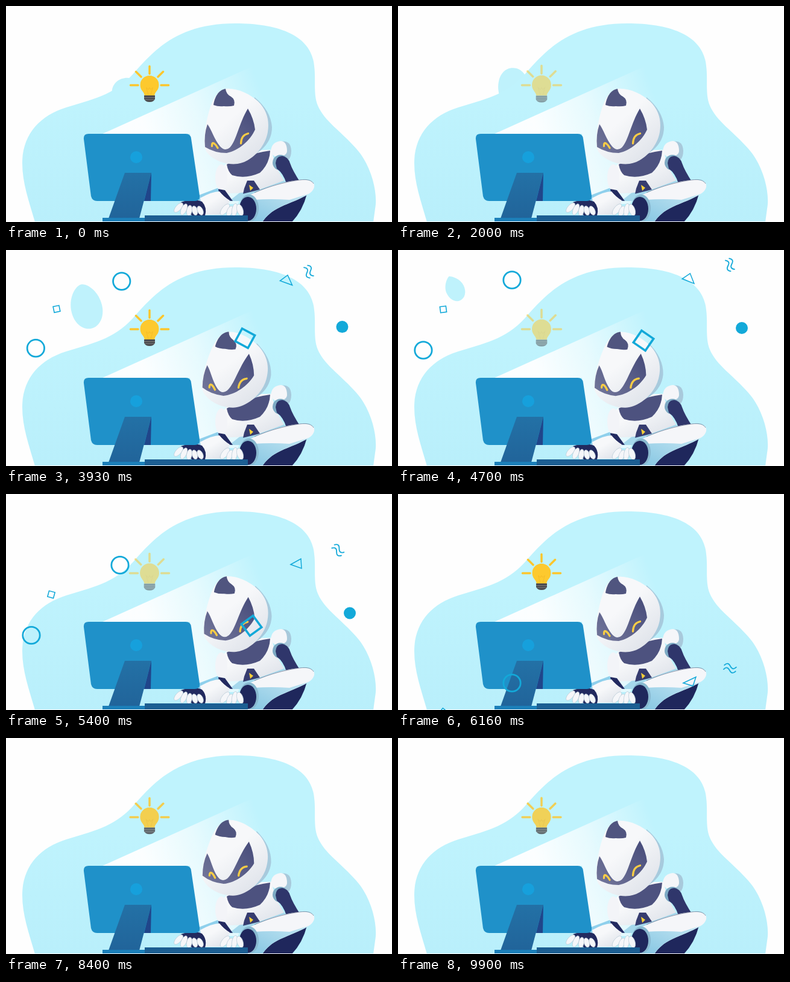
These frames come from a looping animation (640 px wide and 360 px high, 9930 ms). An HTML page:

```html
<!DOCTYPE html>
<html lang="en">
<head>
<meta charset="utf-8">
<title>Robot with an idea</title>
<style>
html, body { margin: 0; width: 100%; height: 100%; overflow: hidden; background: #fefefe; }
svg { display: block; width: 100vw; height: 100vh; }
</style>
</head>
<body>
<svg viewBox="0 0 640 360" xmlns="http://www.w3.org/2000/svg">
  <defs>
    <linearGradient id="sky" x1="0" y1="0" x2="0" y2="1">
      <stop offset=".4" stop-color="#bff3fd"/><stop offset="1" stop-color="#b9effb"/>
    </linearGradient>
    <linearGradient id="beam" gradientUnits="userSpaceOnUse" x1="235" y1="215" x2="425" y2="145">
      <stop offset="0" stop-color="#fff" stop-opacity=".95"/>
      <stop offset=".45" stop-color="#fff" stop-opacity=".62"/>
      <stop offset="1" stop-color="#fff" stop-opacity="0"/>
    </linearGradient>
    <linearGradient id="shell" x1="0" y1="0" x2=".75" y2="1">
      <stop offset=".45" stop-color="#f7f8fa"/><stop offset="1" stop-color="#dfe3ea"/>
    </linearGradient>
    <linearGradient id="visor" x1="0" y1="1" x2="1" y2="0">
      <stop offset="0" stop-color="#73779b"/><stop offset="1" stop-color="#454a79"/>
    </linearGradient>
    <linearGradient id="shade" x1="0" y1="1" x2="1" y2="0">
      <stop offset="0" stop-color="#86c6e2"/><stop offset="1" stop-color="#c4e6f3"/>
    </linearGradient>
    <linearGradient id="stand" x1="0" y1="0" x2="0" y2="1">
      <stop offset="0" stop-color="#2371a6"/><stop offset="1" stop-color="#21649a"/>
    </linearGradient>
  </defs>

  <rect width="640" height="360" fill="#fefefe"/>
  <path id="drop" fill="#bff2fc"/>
  <path fill="url(#sky)" d="M48 360C38 325 27 295 27 262C27 215 55 183 100 169C140 156 178 150 211 113C245 74 285 29 380 29C452 29 507 49 511 100C514 122 509 147 517 166C528 192 556 209 581 238C606 266 617 312 612 338L609 360Z"/>
  <path fill="url(#beam)" d="M160 213L410 100L440 180L385 330H318L305 213Z"/>

  <g id="bulb">
    <path d="M238 100.500V113M224 118L215.500 109.500M252 118L260.500 109.500M206.500 132H219M257 132H269.500" stroke="#fdc62c" stroke-width="3.500" stroke-linecap="round"/>
    <path d="M229.500 149C229.500 143 222.500 141 222.500 131.500A15.500 15.500 0 0 1 253.500 131.500C253.500 141 246.500 143 246.500 149Z" fill="#fdc92e"/>
    <path d="M236 148L232.500 136L236 139L238 136L240 139L243.500 136L240 148" fill="none" stroke="#f6bd28"/>
    <path d="M229 149H247V155Q245 160 238 160Q231 160 229 155Z" fill="#4b4b4e"/>
    <path d="M229 152.500H247M230 156H246" stroke="#8a8a8a" stroke-width=".8"/>
  </g>

  <g id="body">
    <path d="M318 316L352 303L362 316L320 328Z" fill="#8fd0ec"/>
    <path d="M422 360L440 338L499 313Q492 341 474 360Z" fill="#1f275c"/>
    <path d="M398 303L446 284L470 296L410 325L370 325Z" fill="#a5d8ec"/>
    <path d="M455 226Q472 223 473 241Q473 255 464 260L446 240Z" fill="#a8c9db"/>
    <path d="M361 267Q390 238 440 240Q447 270 461 291L420 306Q395 313 364 312Q358 287 361 267Z" fill="url(#shell)"/>
    <ellipse cx="357" cy="286" rx="10" ry="22" fill="#f3f4f8"/>
    <path d="M352 305L363 307L376 325L355 323Z" fill="#232a60"/>
    <path d="M366 264Q400 246 438 241Q437 263 421 278Q397 289 375 282Q368 276 366 264Z" fill="#4d527f"/>
    <path d="M395 304L400 291H411L421 306L393 313Z" fill="#363c6f"/>
    <path d="M403 298L410 303L405 308Z" fill="#f5cf38"/>
    <path d="M439 241Q441 226 456 225Q466 226 466 242Q465 250 451 252Q441 251 439 241Z" fill="#f5f6f9"/>
    <circle cx="455" cy="261" r="13" fill="#7daac4"/>
    <path d="M447 262Q448 250 458 250Q468 252 471 262Q475 274 488 294L465 296Q460 279 449 271Z" fill="#2f366b"/>
  </g>

  <g id="head">
    <path d="M412 152Q439 174 441 202Q441 224 423 240L404 254Z" fill="#a7cadd"/>
    <path d="M364 138C382 136 404 146 418 159C433 174 437 191 434 210C430 235 407 260 384 263C359 266 335 252 330 238C327 222 331 193 338 171C343 155 351 141 364 138Z" fill="url(#shell)"/>
    <path d="M364 138C352 140 346 152 344 165Q352 168 361 167Q371 168 378 166Q381 156 373 151Q365 147 364 138Z" fill="#50557f"/>
    <path d="M334 197C341 206 345 222 355 234Q363 243 371 236C382 225 386 196 401 171Q411 188 413 206C405 224 386 241 366 245Q346 245 330 235Q328 214 334 197Z" fill="url(#visor)"/>
    <path d="M341.500 233.500Q341 227 345 229Q348 231 351 236.500M389.500 229Q390 215 401.500 212.500" fill="none" stroke="#f9cd45" stroke-width="3.300" stroke-linecap="round"/>
  </g>

  <g id="arms">
    <path d="M322 320Q342 309 354 309Q361 318 371 324L361 348L326 348Z" fill="url(#shell)"/>
    <path d="M290 327Q312 320 325 326Q334 336 330 349H308Z" fill="#222a5f"/>
    <path d="M396 320C412 310 440 299 462 294C480 290 500 287 509 294C514 300 510 308 502 313C490 321 470 328 455 335C440 342 432 350 425 360H404Z" fill="#f5f6f9"/>
    <path d="M411 323Q440 321 470 323L502 313C490 321 470 328 455 335C440 342 432 350 425 360H406Q418 342 411 323Z" fill="url(#shade)"/>
    <path d="M412 311C440 299 462 294 480 291S505 289 510 296" fill="none" stroke="#4c5573" stroke-width=".6"/>
    <ellipse cx="403" cy="337" rx="16" ry="23" fill="#89b9d0"/>
    <ellipse cx="401" cy="338" rx="14" ry="20" fill="#1f275c"/>
    <g id="fingers" fill="#f5f6f9" stroke="#b9cbd7" stroke-width=".7"/>
  </g>

  <path d="M137 213H298Q306 213 307 221L321 316Q322 325 313 325H151Q143 325 141 317L129 222Q128 213 137 213Z" fill="#1f91c9"/>
  <circle cx="216" cy="252" r="10" fill="#16a0dc"/>
  <path d="M197 278H241L221 354H170Z" fill="url(#stand)"/>
  <path d="M241 278L240 325H229Z" fill="#20458a"/>
  <path d="M160 353H245V360H160Z" fill="#1b7fb9"/>
  <path d="M230 349H401V360H230Z" fill="#1c5e92"/>
  <path d="M0 359H640V360H0Z" fill="#fefefe"/>
  <g id="bits" fill="none" stroke="#13a9d9" stroke-linecap="round"/>
</svg>
<script>
const LOOP = 9930, HOLD = 1230;
const NS = 'http://www.w3.org/2000/svg';
const el = id => document.getElementById(id);
const lerp = (a, b, u) => a + (b - a) * u;
const clamp = u => Math.max(0, Math.min(1, u));
const unit = (t, a, b) => clamp((t - a) / (b - a));
const smooth = u => u * u * (3 - 2 * u);
const easeOut = u => 1 - (1 - u) ** 3;
const wavePhase = turns => Math.cos(turns * 2 * Math.PI);

function add(parent, tag, attrs) {
  const node = document.createElementNS(NS, tag);
  for (const key in attrs) node.setAttribute(key, attrs[key]);
  return parent.appendChild(node);
}

// cx, cy, rx, ry, tilt
[[286, 336, 4.5, 10, 42], [295, 339, 4.5, 10, 25], [304, 341, 4.5, 9, 10],
 [313, 341, 4.5, 8, -15], [322, 341, 4.5, 8, -25], [363, 339, 5, 11, 38],
 [371, 342, 4.5, 9, 22], [379, 340, 4.5, 11, 10], [388, 340, 5, 10, -18]
].forEach(([cx, cy, rx, ry, a]) =>
  add(el('fingers'), 'ellipse', { cx, cy, rx, ry, transform: `rotate(${a} ${cx} ${cy})` }));

const wave = y => `M-10.5 ${y}Q-5.5 ${y - 7} -.5 ${y}T9.500 ${y}`;
const square = (s, w) => ['rect', { x: -s / 2, y: -s / 2, width: s, height: s, 'stroke-width': w, 'stroke-linecap': 'butt' }];
const ring = ['circle', { r: 14.2, 'stroke-width': 2.8 }];
const early = u => smooth(u ** .75);

// x, y: top of flight; start, end: launch span; rot: angles at launch, top and exit
const bits = [
  { x: 551, y: 24, start: 2700, end: 4500, rot: [32, 66, 10], ease: early, shape: ['path', { d: wave(-3) + wave(4), 'stroke-width': 1.8 }] },
  { x: 189, y: 49, start: 3180, end: 4400, rot: [0, 0, 0], shape: ring },
  { x: 42, y: 166, start: 3200, end: 4300, rot: [0, 0, 0], shape: ring },
  { x: 75, y: 98, start: 3250, end: 4350, rot: [-60, -9, 40], shape: square(10, 1.6) },
  { x: 407, y: 150, start: 3220, end: 4400, rot: [-40, 33, 75], shape: square(24, 3.6) },
  { x: 570, y: 129, start: 3200, end: 4300, rot: [0, 0, 0], shape: ['circle', { r: 10, fill: '#13a9d9', stroke: 'none' }] },
  { x: 483, y: 47, start: 3250, end: 4400, rot: [-30, 0, 0], tri: true, shape: ['path', { 'stroke-width': 1.5 }] }
];
for (const b of bits) b.node = add(el('bits'), ...b.shape);

function drawBits(t) {
  const fall = 110 * (Math.max(0, t - 4606) / 1000) ** 2;
  const turn = unit(t, 4650, 6160);
  for (const b of bits) {
    const u = unit(t, b.start, b.end);
    const go = (b.ease || easeOut)(u);
    const x = lerp(237, b.x, go), y = lerp(104, b.y, go) + fall;
    const a = turn > 0 ? lerp(b.rot[1], b.rot[2], turn) : lerp(b.rot[0], b.rot[1], go);
    b.node.style.display = u > 0 && y < 385 ? '' : 'none';
    b.node.setAttribute('transform', `translate(${x} ${y}) rotate(${a}) scale(${Math.min(1, .3 + u * 3)})`);
    if (b.tri) {
      const m = (p, q) => lerp(p, q, turn);
      b.node.setAttribute('d', `M${m(-12, -10)} ${m(0, 2)}L${m(1, 11)} ${m(-9, -8)}L${m(8, 6)} ${m(8, 7)}Z`);
    }
  }
}

// time, cx, cy, rx, ry, tilt, roundness of the tip
const dropKeys = [
  [HOLD, 199, 141, 24, 21, -20, .55],
  [2200, 191, 135, 26, 34, -5, .6],
  [3100, 177, 128, 37.5, 55, 0, .62],
  [4700, 94, 64, 15.5, 22, -25, .16],
  [5400, 76, 45, 0, 0, -30, .1]
];

function drawDrop(t) {
  const time = Math.max(HOLD, t);
  let i = 0;
  while (i < dropKeys.length - 2 && time > dropKeys[i + 1][0]) i++;
  const from = dropKeys[i], to = dropKeys[i + 1];
  const u = smooth(unit(time, from[0], to[0]));
  const [, cx, cy, rx, ry, tilt, k] = from.map((v, j) => lerp(v, to[j], u));
  const X = v => v * rx, Y = v => v * ry;
  el('drop').setAttribute('d',
    `M0 ${Y(-1)}C${X(k)} ${Y(-1)} ${X(1)} ${Y(-.55)} ${X(1)} ${Y(.1)}` +
    `C${X(1)} ${Y(.62)} ${X(.55)} ${Y(1)} 0 ${Y(1)}` +
    `C${X(-.55)} ${Y(1)} ${X(-1)} ${Y(.62)} ${X(-1)} ${Y(.1)}` +
    `C${X(-1)} ${Y(-.55)} ${X(-k)} ${Y(-1)} 0 ${Y(-1)}Z`);
  el('drop').setAttribute('transform', `translate(${cx} ${cy}) rotate(${tilt})`);
}

function draw(t) {
  const run = Math.max(0, t - HOLD);
  const glow = clamp(.5 + 1.7 * (wavePhase(run / 549.5 + .08) - .58));
  el('bulb').setAttribute('opacity', lerp(.5, 1, glow));
  const grow = lerp(1.03, 1, glow);
  el('bulb').setAttribute('transform', `translate(238 132) scale(${grow}) translate(-238 -132)`);

  const nod = (1 - wavePhase(Math.max(0, t - 2350) / 3775)) / 2;
  el('head').setAttribute('transform', `rotate(${6.3 * nod} 383 190)`);
  drawDrop(t);
  drawBits(t);
}

const begin = performance.now();
function tick() {
  draw((performance.now() - begin) % LOOP);
  requestAnimationFrame(tick);
}
tick();
</script>
</body>
</html>
```
